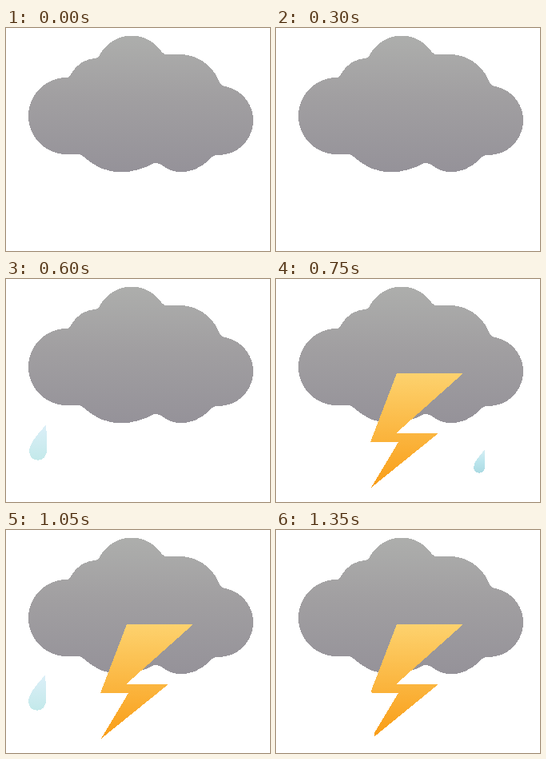
An HTML page that plays this animation: 330x279 px, repeating every 1.5 s.

```html
<!DOCTYPE html>
<html lang="en">
<head>
<meta charset="utf-8">
<title>Thunderstorm</title>
<style>
html, body { margin: 0; width: 100%; height: 100%; overflow: hidden; background: #fff; }
svg { display: block; shape-rendering: crispEdges; }
</style>
</head>
<body>
<svg width="330" height="279" viewBox="0 0 330 279">
  <defs>
    <linearGradient id="grey" x2="0" y2="1">
      <stop stop-color="#adaeac"/><stop offset=".45" stop-color="#a19fa1"/><stop offset="1" stop-color="#959299"/>
    </linearGradient>
    <linearGradient id="gold" x2="0" y2="1">
      <stop stop-color="#fdd26e"/><stop offset="1" stop-color="#f99d17"/>
    </linearGradient>
    <linearGradient id="deep" x2="0" y2="1">
      <stop stop-color="#d6eef3"/><stop offset=".5" stop-color="#bbe5ed"/><stop offset="1" stop-color="#abdae2"/>
    </linearGradient>
    <linearGradient id="pale" x2="0" y2="1">
      <stop stop-color="#dceff8"/><stop offset="1" stop-color="#c3e9ea"/>
    </linearGradient>
  </defs>
  <path fill="url(#grey)" d="M76 158A48 48 0 0 1 76 62Q79 62 81 58C88 45 99 39 111 38Q115 38 117 34A45 45 0 0 1 194 29Q197 33 201 33L217 33A53 53 0 0 1 266 66Q268 72 274 73A43.4 43.4 0 0 1 266 159L262 159Q258 160 253 166C234 183 212 184 197 173Q190 168 185 169C157 184 125 187 97 161Q94 158 90 158Z"/>
  <path id="bolt" fill="url(#gold)"/>
  <path id="drop" d="M27 0C21 8 0 28 0 43C0 52 7 57 14 57C23 57 27 50 28 43C30 28 27 14 27 0Z"/>
</svg>
<script>
const STEP = 150, STEPS = 10;
const bolt = document.getElementById('bolt');
const drop = document.getElementById('drop');

// Places are [x, y, scale, gradient]
const front = [74, 207, 1, 'deep'];
const left = [29, 182, 0.785, 'pale'];
const middle = [204, 202, 0.785, 'pale'];
const far = [247, 214, 0.505, 'deep'];
const shift = ([x, y, ...rest]) => [x - 1, y - 1, ...rest];
const drops = [null, middle, null, front, left, far, shift(front), shift(left), shift(middle), null];

const upperBolt = 'M151 118H234L150 193H203';
const fullBolt = upperBolt + 'L119 261L153 204H118Z';
const fadingBolt = upperBolt + 'L126 256L123 258V254L153 204H120L119 201Z';

function draw(now) {
  const step = Math.floor(now / STEP) % STEPS;
  bolt.setAttribute('d', step < 5 ? '' : step < 9 ? fullBolt : fadingBolt);
  const place = drops[step];
  drop.style.display = place ? '' : 'none';
  if (place) {
    const [x, y, scale, fill] = place;
    drop.setAttribute('transform', `translate(${x} ${y}) scale(${scale})`);
    drop.setAttribute('fill', `url(#${fill})`);
  }
}

const start = performance.now();
function tick() {
  draw(performance.now() - start);
  requestAnimationFrame(tick);
}
tick();
</script>
</body>
</html>
```
